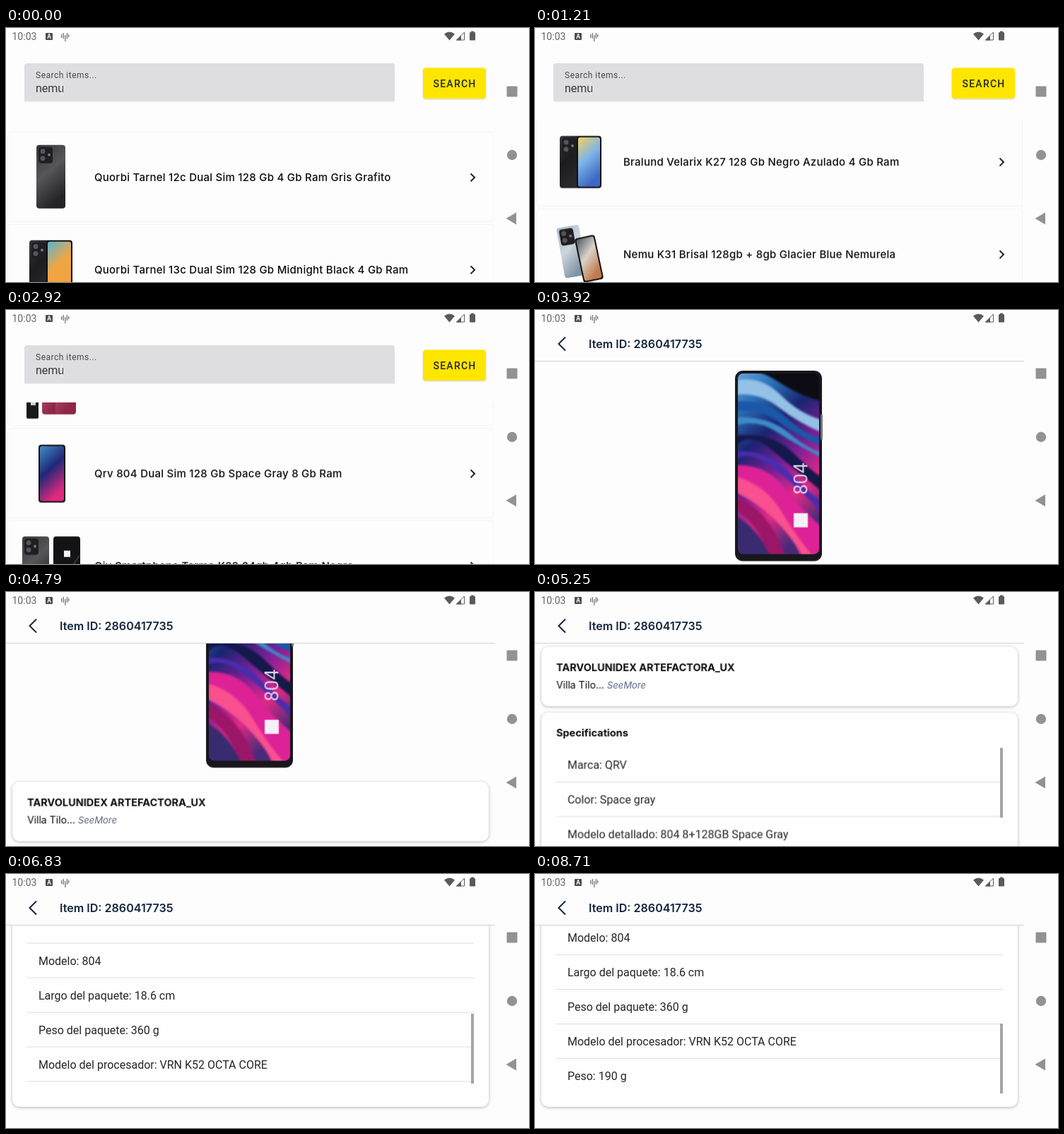
Animation of 740 by 360 pixels, one loop 8.75 s. Source, as an HTML page:

```html
<!DOCTYPE html>
<html lang="es">
<head>
<meta charset="utf-8">
<title>Item search</title>
<style>
  html, body { margin: 0; width: 100%; height: 100%; overflow: hidden; background: #fdfdfd; }
  svg { display: block; }
  text { font-family: Roboto, "Noto Sans", sans-serif; fill: #262626; white-space: pre; }
  .geo { font-family: Inter, "Open Sans", sans-serif; fill: #0c0c0e; }
  .title { font-size: 15px; font-weight: 500; letter-spacing: .25px; }
  .head { font-size: 14.5px; font-weight: 700; }
  .bar { font-size: 16.1px; font-weight: 600; fill: #14263e; }
  .spec { font-size: 16px; }
  .card { fill: #fefefe; filter: drop-shadow(0 1px 2px #b4b4b4); }
  .item { fill: none; stroke: #f4f4f4; }
  .line { fill: none; stroke-width: 2; stroke: #1a1a1a; }
</style>
</head>
<body>
<svg id="stage" width="740" height="360" viewBox="0 0 740 360"></svg>
<script>
const LOOP = 8750;
const PITCH = 131;       // list row spacing
const SPEC = 49;         // specification row height
const PANE = 231;        // visible height of the specification list
const BAR = 99;          // scrollbar length
const PAPER = '#fdfdfd', ICON = '#5a5a5a', NAV = '#929292';

const rect = (x, y, w, h, fill, r = 0, more = '') =>
  `<rect x="${x}" y="${y}" width="${w}" height="${h}" rx="${r}" fill="${fill}" ${more}/>`;
const text = (x, y, str, cls = '', more = '') =>
  `<text x="${x}" y="${y}" class="${cls}" ${more}>${str}</text>`;
const path = (d, fill, more = '') => `<path d="${d}" fill="${fill}" ${more}/>`;
const dot = (x, y, r, fill) => `<circle cx="${x}" cy="${y}" r="${r}" fill="${fill}"/>`;

const grads = {
  slate: ['#37373a', '#565659', '#242427'],
  coal: ['#38383c', '#1c1c20', '#2a2a2e'],
  orange: ['#58b4d0', '#f0a544', '#f2a23c'],
  sky: ['#f3d45a', '#7fb4ea', '#3d68c4'],
  silver: ['#a6b8c4', '#ccd6de', '#8092a4'],
  petal: ['#4f565c', '#d8d3cc', '#c27b4e'],
  rose: ['#a8345c', '#c04868', '#8c2748'],
  plum: ['#3f8fc8', '#1f2878', '#e0287e'],
  glow: ['#69a9dc', '#2a6fb8', '#1a2470', '#7a1f96', '#e02a86', '#4a2a78']
};
const gradDefs = Object.entries(grads).map(([id, cols]) =>
  `<linearGradient id="${id}" x1="0" y1="0" x2=".4" y2="1">` +
  cols.map((c, i) => `<stop offset="${i / (cols.length - 1)}" stop-color="${c}"/>`).join('') +
  '</linearGradient>').join('');
const g = id => `url(#${id})`;

// Thumbnails, drawn around the row's middle line
const back = (x, y, w, h, id) =>
  rect(x, y, w, h, g(id), 4) + rect(x + 3, y + 3, 20, 23, '#1f1f22', 4) +
  dot(x + 9, y + 9, 3.5, '#55555a') + dot(x + 9, y + 19, 3.5, '#55555a') + dot(x + 18, y + 14, 2, '#77777c');
const front = (x, y, w, h, id) =>
  rect(x, y, w, h, '#111114', 4) + rect(x + 2, y + 2, w - 4, h - 4, g(id), 3);
const pair = (a, b) => back(35, -37, 30, 74, a) + front(59, -37, 35, 74, b);

const thumbs = {
  single: back(43, -46, 41, 90, 'slate'),
  warm: back(33, -42, 30, 82, 'coal') + front(57, -42, 37, 84, 'orange'),
  blue: pair('coal', 'sky'),
  tilt: `<g transform="rotate(-10 50 -5)">${back(36, -40, 32, 72, 'silver')}</g>` +
    `<g transform="rotate(-12 76 6)">${front(62, -26, 29, 64, 'petal')}</g>`,
  twin: back(23, -42, 38, 81, 'slate') + rect(67, -42, 38, 81, '#131315', 4) +
    path('M68 25Q88 10 104-15M68 12Q90 18 104 32M74 37Q82 5 104 0', 'none', 'stroke="#77777a" stroke-width=".8"') +
    rect(82, -22, 9, 9, '#f4f4f4'),
  rose: back(51, -41, 24, 88, 'rose') + rect(70, -41, 29, 88, g('rose'), 4) + dot(88, -1, 3, '#d77a94') +
    rect(29, 9, 17, 44, '#19191c', 2) + rect(35, 18, 7, 16, '#d4d4d8'),
  plum: front(46, -41, 38, 82, 'plum')
};

const items = [
  ['Quorbi Tarnel 12c Dual Sim 128 Gb 4 Gb Ram Gris Grafito', 'single'],
  ['Quorbi Tarnel 13c Dual Sim 128 Gb Midnight Black 4 Gb Ram', 'warm'],
  ['Quorbi Tarnel 10d Dual Sim 64 Gb Azul 4 Gb Ram', 'blue'],
  ['Nemu K12 Dual Sim 128 Gb Gris 4 Gb Ram', 'single'],
  ['Bralund Velarix K27 128 Gb Negro Azulado 4 Gb Ram', 'blue'],
  ['Nemu K31 Brisal 128gb + 8gb Glacier Blue Nemurela', 'tilt'],
  ['Bralund Velarix K19 128 Gb Negro 4 Gb Ram', 'warm'],
  ['Nemu K14 Dual Sim 128 Gb Azul 4 Gb Ram', 'tilt'],
  ['Qiv Smartphone Tarmo K38 128gb 4gb Ram Gris', 'twin'],
  ['Nemurela Brin 70 Soltane 5g 256 Gb Ante Rosa 8 Gb Ram', 'rose'],
  ['Qrv 804 Dual Sim 128 Gb Space Gray 8 Gb Ram', 'plum'],
  ['Qiv Smartphone Tarmo K22 64gb 4gb Ram Negro', 'twin']
];
const item = ([name, kind], i) => `<g transform="translate(0 ${212 + i * PITCH})">
  ${rect(2.5, -64.5, 687, 127, '', 4, 'class="item"')}
  ${thumbs[kind]}
  ${text(125, 5, name, 'geo title')}
  <path class="line" d="M657.5-5.5l5.5 5.5-5.5 5.5"/></g>`;

const specs = [
  'Marca: QRV', 'Color: Space gray', 'Modelo detallado: 804 8+128GB Space Gray',
  'Código universal de producto: 5302618847265', 'Condición del ítem: Nuevo',
  'Línea: 804', 'Modelo: 804', 'Largo del paquete: 18.6 cm', 'Peso del paquete: 360 g',
  'Modelo del procesador: VRN K52 OCTA CORE', 'Peso: 190 g'
];
const specRow = (str, i) => text(46, i * SPEC + 30, str, 'spec') +
  (i < specs.length - 1 ? rect(30, (i + 1) * SPEC - 1, 632, 1, '#dedede') : '');

const status = text(8.5, 17, '10:03', '', 'font-size="14" style="fill:#666"') +
  rect(56, 7, 10, 10, '#4c4c4c', 1) +
  text(61, 15.3, 'A', '', `font-size="8.5" font-weight="700" text-anchor="middle" style="fill:${PAPER}"`) +
  [[78, 9, 5], [80.6, 7, 8], [83.2, 10, 9], [85.8, 7, 8], [88, 9, 4]]
    .map(([x, y, h]) => rect(x, y, 1.3, h, '#747474')).join('') +
  path('M620 8.5Q627.5 2.5 635 8.5L627.5 17.5Z', ICON) +
  path('M637.5 17L648.5 6V17Z', 'none', `stroke="${ICON}"`) + path('M637 17.5L644 10.5V17.5Z', ICON) +
  rect(656, 6, 8, 11.5, ICON, 1) + rect(658, 4.5, 4, 2, ICON);

const nav = rect(708.5, 82.5, 15, 15, NAV, 1) + dot(716, 180, 7.2, NAV) +
  path('M707.5 270L722 261.5V278.5Z', NAV);

const search = path('M26 54q0-4 4-4H546q4 0 4 4V104H26Z', '#dedee0') + rect(26, 103.5, 524, 1.5, '#ececec') +
  text(42, 71, 'Search items...', '', 'font-size="12" letter-spacing=".5" style="fill:#484848"') +
  text(42, 91, 'nemu', '', 'font-size="16" style="fill:#383838"') + rect(78.5, 77, 1, 18, '#f6f6f6') +
  rect(590, 56.5, 89, 43.5, '#ffe600', 4, 'style="filter:drop-shadow(0 1px 1px #d4d0b0)"') +
  text(604.5, 84, 'SEARCH', '', 'font-size="14" font-weight="500" letter-spacing="1.25"');

// Large picture, in a 124 x 270 box
const picture = `<g transform="translate(283 86)" style="filter:blur(.7px)">
  ${rect(0, 0, 123, 270, '#17171c', 11)}${rect(121, 62, 3, 36, '#77777e', 1)}
  <g clip-path="url(#glass)"><g style="filter:blur(1.6px)">
  ${rect(0, 0, 124, 270, g('glow'))}
  ${path('M0-9H134V46Q96 38 68 20T30 2Z', '#0c0c12')}
  ${path('M0 14Q36 6 64 34T124 70V88Q90 74 62 52T0 34Z', '#94c2e6')}
  ${path('M0 44Q44 40 72 66T124 96V108Q88 92 60 72T0 58Z', '#1b58a8')}
  ${path('M0 66Q48 64 76 88T124 116V124Q86 104 58 86T0 78Z', '#3f8cca')}
  ${path('M0 92Q52 86 84 118T124 150V172Q84 140 52 112T0 108Z', '#14184a')}
  ${path('M0 114Q46 112 74 142T124 186V202Q84 160 52 136T0 126Z', '#4a2cae')}
  ${path('M0 134Q44 132 70 166T124 222V270H96Q66 192 0 166Z', '#dc2296')}
  ${path('M0 150Q42 160 66 200T112 264H96Q60 200 0 172Z', '#fa5090')}
  ${path('M0 178Q34 190 58 232L72 264H50Q30 214 0 196Z', '#9c1668')}
  ${path('M0 206Q34 222 52 270H0Z', '#3a2a70')}
  </g></g>
  ${dot(61, 8, 2, '#08080a')}
  ${rect(83, 202, 20, 20, '#f6f0f6')}
  ${text(0, 0, '804', '', 'font-size="27" transform="translate(102.5 176) rotate(-90)" style="fill:#e4cdea"')}
</g>`;

const seller = rect(9, 376, 674, 84, '', 10, 'class="card"') +
  text(30, 410, 'TARVOLUNIDEX ARTEFACTORA_UX', 'geo head') +
  `<text x="30" y="434.5" class="geo" font-size="14">Villa Tilo... <tspan font-size="13" font-style="italic" fill="#5c6484">SeeMore</tspan></text>`;

const specCard = rect(9, 469, 674, 300, '', 10, 'class="card"') +
  text(30, 503, 'Specifications', 'geo head') +
  `<g transform="translate(0 519)"><g clip-path="url(#pane)">
    <g id="specs">${specs.map(specRow).join('')}</g>
    <g id="bar">${rect(658, 0, 4, BAR, '#a6a6a6')}</g></g></g>`;

const toolbar = '<path class="line" d="M43 38.5L33.5 48L43 57.5" style="stroke:#14263e"/>' +
  text(76, 53.5, 'Item ID: 2860417735', 'geo bar') +
  rect(0, 72, 692, 1, '#d2d2d2');

document.getElementById('stage').innerHTML = `<defs>${gradDefs}
  <clipPath id="list">${rect(0, 131, 692, 229)}</clipPath>
  <clipPath id="page">${rect(0, 73, 692, 287)}</clipPath>
  <clipPath id="pane">${rect(0, 0, 692, PANE)}</clipPath>
  <clipPath id="glass">${rect(4, 4, 115, 256, '', 7)}</clipPath></defs>
  ${rect(0, 0, 740, 360, PAPER)}
  <g id="home">${search}<g clip-path="url(#list)"><g id="items">${items.map(item).join('')}</g></g></g>
  <g id="detail">${toolbar}<g clip-path="url(#page)"><g id="stretch" style="transform-origin:0 360px">
    <g id="content">${picture}${seller}${specCard}</g></g></g></g>
  ${status}${nav}`;

// Steps are [time, value, easing to the next step]
function play(id, prop, steps) {
  const last = steps[steps.length - 1];
  const frames = [...steps, [LOOP, last[1]]].map(([t, value, easing = 'linear']) =>
    ({ offset: t / LOOP, [prop]: value, easing }));
  document.getElementById(id).animate(frames, { duration: LOOP, iterations: Infinity });
}
const up = y => `translateY(${-y}px)`;
const FLING = 'cubic-bezier(.35,.1,.35,1)';
const end = specs.length * SPEC - PANE;

play('items', 'transform', [[0, up(0), FLING], [1210, up(546)], [1290, up(546), FLING],
  [2040, up(1065), FLING], [2420, up(1290)]]);
play('home', 'opacity', [[0, 1], [3250, 1], [3500, 0]]);
play('detail', 'opacity', [[0, 0], [3840, 0], [3920, 1]]);
play('content', 'transform', [[0, up(0)], [4440, up(0), 'cubic-bezier(.4,0,.6,.9)'],
  [5250, up(298), 'cubic-bezier(.3,.3,.5,1)'], [5900, up(439)]]);
play('stretch', 'transform', [[0, 'scaleY(1)'], [5860, 'scaleY(1)', 'ease-out'],
  [5960, 'scaleY(1.016)', 'ease-in-out'], [6200, 'scaleY(1)']]);
play('specs', 'transform', [[0, up(0)], [6240, up(0), FLING], [7130, up(end)]]);
play('bar', 'transform', [[0, up(0)], [6240, up(0), FLING], [7130, up(BAR - PANE)]]);
</script>
</body>
</html>
```
